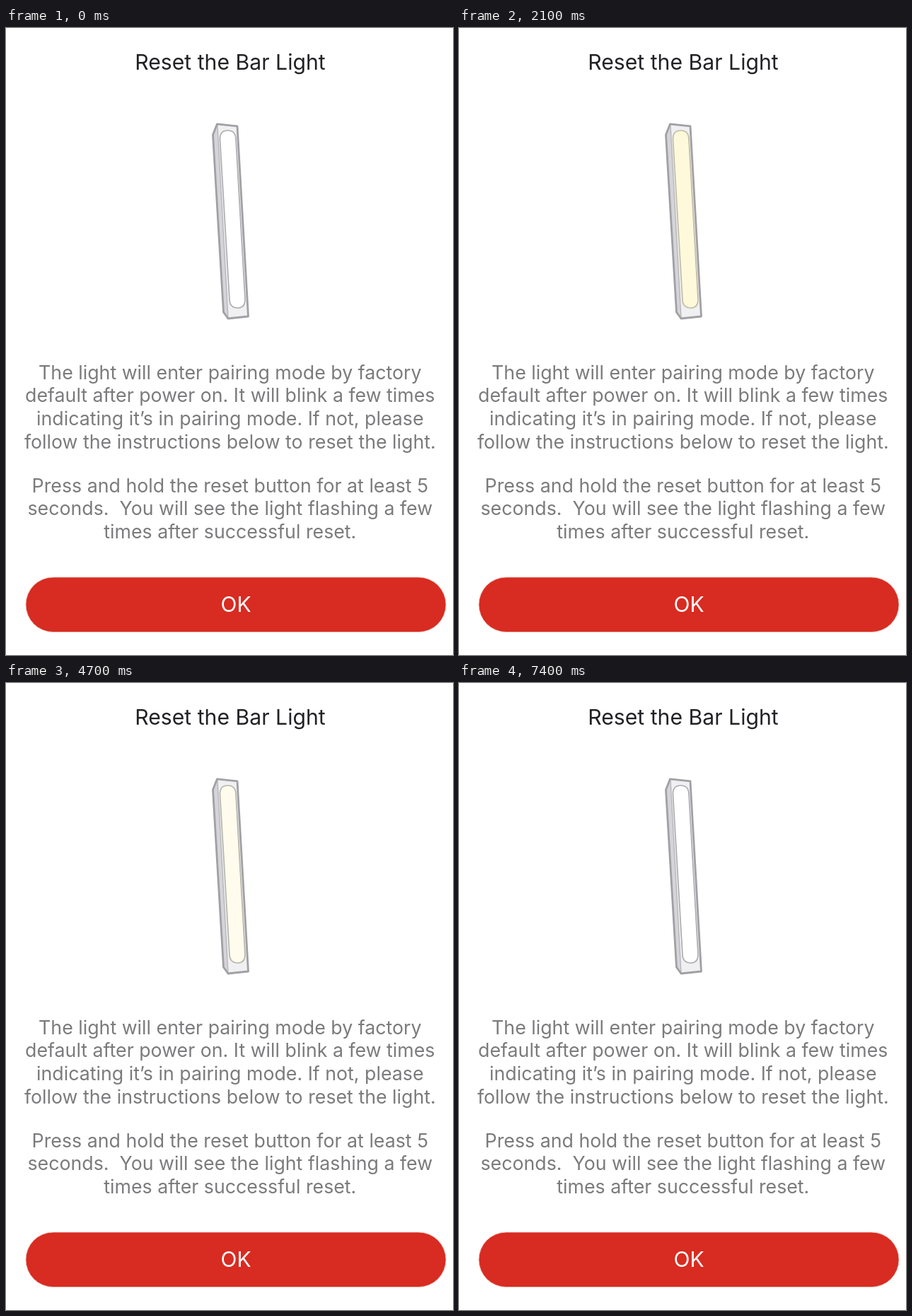
An HTML page for the animation above (8130 ms loop, 632 by 887 pixels).

```html
<!DOCTYPE html>
<html lang="en">
<head>
<meta charset="utf-8">
<title>Reset the Bar Light</title>
<style>
html, body { margin: 0; width: 100%; height: 100%; overflow: hidden; background: #fff; }
svg { display: block; width: 100%; height: 100%; }
text { font-family: Inter, Roboto, sans-serif; text-anchor: middle; }
.title { font-size: 30.2px; fill: #222226; }
.copy { font-size: 26.75px; fill: #7b7b7d; }
.ok { font-size: 30px; fill: #fff; }
.tip { font-size: 15.1px; font-weight: 500; fill: #fff; }
.line { fill: none; stroke-linecap: round; stroke-linejoin: round; }
</style>
</head>
<body>
<svg viewBox="0 0 632 887">
  <defs>
    <linearGradient id="skin" gradientUnits="userSpaceOnUse" x1="385" y1="340" x2="425" y2="412">
      <stop offset="0" stop-color="#5c5c60"/>
      <stop offset=".5" stop-color="#77777b"/>
      <stop offset="1" stop-color="#77777b" stop-opacity="0"/>
    </linearGradient>
    <linearGradient id="cord" gradientUnits="userSpaceOnUse" x1="113" y1="0" x2="134" y2="0">
      <stop offset="0" stop-color="#b4b4b8" stop-opacity=".1"/>
      <stop offset="1" stop-color="#a8a8ac"/>
    </linearGradient>
    <linearGradient id="palm" x1="0" y1="0" x2="0" y2="1">
      <stop offset="0" stop-color="#f7f6fb"/>
      <stop offset="1" stop-color="#fff"/>
    </linearGradient>
    <path id="case" d="M128 214Q129 206 140 203L190 195.500Q202 194 212 197L301 232Q312 237 311.500 248L309 270Q306 281 294 285L252 293Q243 294 235 291L136 249Q126.500 245 126.500 236Z"/>
    <clipPath id="body"><use href="#case"/></clipPath>
  </defs>

  <text class="title" x="317" y="59">Reset the Bar Light</text>
  <g id="copy"></g>
  <rect x="28" y="777" width="594" height="77.500" rx="38.700" fill="#d82b21" stroke="#eebfb4" stroke-width=".8"/>
  <text class="ok" x="325" y="826">OK</text>

  <g id="bar">
    <path d="M292.500 151L298.500 135.800L327 138.800L342.500 408L314 411L307.500 402Z" fill="#f0f0f2"/>
    <path d="M292.500 151L298.500 136L314 411L307.500 402Z" fill="#d5d5d9"/>
    <path class="line" d="M299 138L314 410" stroke="#b4b4b8" stroke-width="1.300"/>
    <path class="line" d="M292.500 151L298.500 135.800L327 138.800L342.500 408L314 411L307.500 402Z" stroke="#a0a0a5" stroke-width="2.800"/>
    <path id="pane" d="M302.500 157Q302.500 145 313.500 145Q324.500 145 325 157L338 384Q338 396 327.500 396Q316.500 396 316 384Z" stroke-width="1.700"/>
  </g>

  <g id="scene" opacity="0">
    <path d="M113 196L136 197L140 204L113 204ZM113 207L130 207L128 218L113 214Z" fill="url(#cord)" opacity=".75"/>
    <g clip-path="url(#body)">
      <path d="M120 190H320V300H120Z" fill="#fff"/>
      <path d="M124 232L232 271Q243 274 256 271L262 300H120Z" fill="#e5e5e8"/>
      <path d="M224 248Q238 253 256 250L262 272Q240 276 222 268Z" fill="#f3f3f5"/>
      <path class="line" d="M129 213L226 247Q236 251 248 249L311 239" stroke="#dedee1" stroke-width="1.200"/>
    </g>
    <path d="M268 254L302 243.500Q311 241 311 249L308.500 269Q307 277 298 280L268 285.500Q259 287 259 278L260 264Q261 257 268 254Z" fill="#ededf0" stroke="#8c8c90" stroke-width="1.500"/>
    <path class="line" d="M260 270L310 256" stroke="#c8c8cc"/>
    <use href="#case" class="line" stroke="#909094" stroke-width="2.800"/>
    <g class="line" stroke="#8c8c90" stroke-width="1.300" transform="rotate(-2 251 231)">
      <ellipse cx="251" cy="230.500" rx="27.500" ry="9.800"/>
      <ellipse cx="251" cy="231.500" rx="22.500" ry="7.700"/>
    </g>
    <circle cx="195" cy="211.500" r="5" fill="#c8c8cc"/>
    <circle cx="287" cy="263.500" r="2.600" fill="#6e6e72"/>

    <g id="hand">
      <path d="M334 276C338 258 350 250 368 250C392 250 407 262 424 280C442 296 447 318 445 351L480 387L412 411C385 397 363 387 346 367C332 349 324 328 325 315C326 302 331 294 334 283Z" fill="#fff"/>
      <path d="M385 301Q395 310 407 300Q420 311 443 304Q446 330 443 351L450 372Q415 374 394 346Z" fill="url(#palm)"/>
      <g class="line" stroke="#5c5c60" stroke-width="1.500">
        <path d="M298 269L309 272.500M329 277L343 280"/>
        <path d="M312 267L329 271.500L326.500 282.500L308.500 277.500Z" fill="#fff"/>
        <path d="M333 276C337 259 348 249.500 364 249.500Q376 250 384 258M367 262C371 272 379 279 389 288M376 253C387 263 392 282 408 292M384 256Q391 253 398 261C407 268 408 284 421 292M398 260Q407 260 414 268C420 278 425 285 433 291M414 268C433 283 443 300 445 322"/>
        <path d="M343 280C345 294 346 324 355 334C361 340 368 334 368 323C368 306 361 280 342 276"/>
        <path d="M334 283C330 295 325 303 325 316"/>
        <path d="M325 316C326 335 338 358 354 376C368 390 389 398 412 411M445 322Q446 337 444 350Q456 372 480 387" stroke="url(#skin)"/>
      </g>
    </g>
    <g id="tip">
      <path d="M341 196Q362 187 389 185V201Q365 195 341 196Z" fill="#f04247"/>
      <rect x="387.700" y="173.700" width="139.500" height="51.300" rx="9" fill="#f04247"/>
      <text class="tip" x="458" y="204.500">Press for 5 sec</text>
    </g>
  </g>
</svg>
<script>
const LOOP = 8130, STEP = 100;
const $ = id => document.getElementById(id);

const copy = [
  [496.5, "The light will enter pairing mode by factory"],
  [529, "default after power on. It will blink a few times"],
  [562, "indicating it\u2019s in pairing mode. If not, please"],
  [594.5, "follow the instructions below to reset the light."],
  [656.5, "Press and hold the reset button for at least 5"],
  [689, "seconds.\u00a0 You will see the light flashing a few"],
  [721.5, "times after successful reset."]
];
$("copy").innerHTML = copy.map(([y, s]) =>
  `<text class="copy" x="316.800" y="${y}">${s}</text>`).join("");

// Pane looks: [fill, edge]
const off = [[255, 255, 255], [174, 174, 178]];
const warm = [[255, 245, 195], [208, 198, 158]];
const blue = [[224, 226, 255], [186, 190, 236]];
const pink = [[255, 228, 232], [238, 194, 202]];
const green = [[228, 248, 230], [190, 224, 194]];

const pulse = [.25, .6, .85, 1, 1, .85, .5, .28, .15, .15];
const fade = [[0, 0], [400, 1], [1300, 1], [1800, 0]];
const reach = [[300, 1], [900, 0]];
const bubble = [[500, 0], [900, 1]];

function at(keys, t) {
  if (t <= keys[0][0]) return keys[0][1];
  for (let i = 1; i < keys.length; i++) {
    const [t0, a] = keys[i - 1], [t1, b] = keys[i];
    if (t <= t1) return a + (b - a) * (t - t0) / (t1 - t0);
  }
  return keys[keys.length - 1][1];
}

const mix = (a, b, k) => a.map((v, i) => Math.round(v + (b[i] - v) * k));

function look(t) {
  if (t < 2000 || t >= 7400) return off;
  if (t >= 6700) return green;
  if (t >= 6100) return pink;
  if (t >= 5400) return blue;
  const k = pulse[t % 1000 / STEP];
  return off.map((c, i) => mix(c, warm[i], k));
}

function draw(now) {
  const t = Math.floor(now % LOOP / STEP) * STEP;
  const shown = at(fade, t), away = at(reach, t);
  const [fill, edge] = look(t);
  $("scene").setAttribute("opacity", shown);
  $("bar").setAttribute("opacity", 1 - shown);
  $("hand").setAttribute("transform", `translate(${24 * away} ${8 * away})`);
  $("tip").setAttribute("opacity", at(bubble, t));
  $("pane").setAttribute("fill", `rgb(${fill})`);
  $("pane").setAttribute("stroke", `rgb(${edge})`);
}

const start = performance.now();
function tick() {
  draw(performance.now() - start);
  requestAnimationFrame(tick);
}
tick();
</script>
</body>
</html>
```
